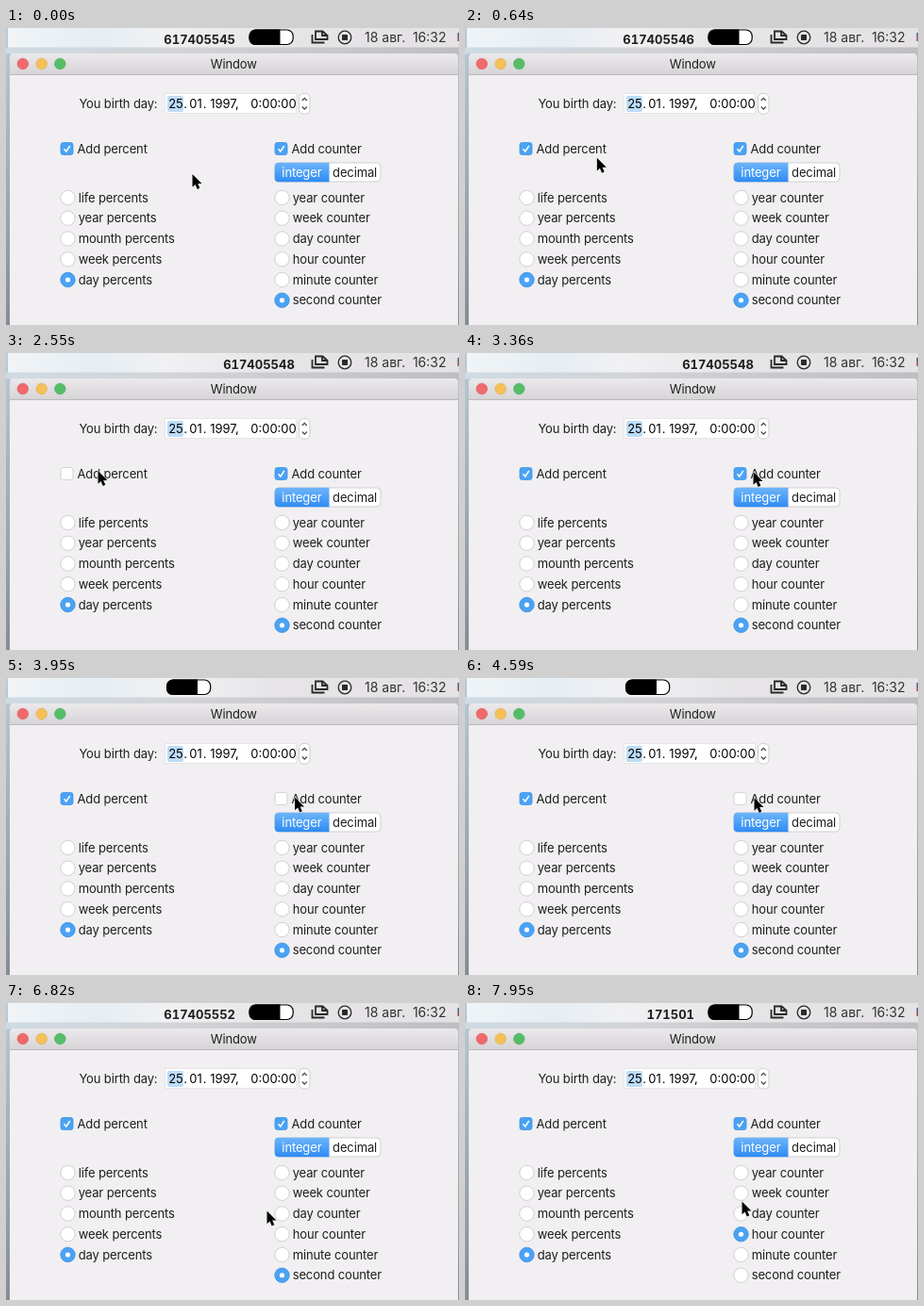
Write an HTML page that moves like this. It is 480 px wide and 315 px high and loops after 8 s.

```html
<!DOCTYPE html>
<html lang="en">
<head>
<meta charset="utf-8">
<title>Window</title>
<style>
html, body { margin: 0; width: 100%; height: 100%; overflow: hidden; background: #f1eff1; }
svg { display: block; width: 480px; height: 315px; }
text { font: 13px Inter, Roboto, sans-serif; letter-spacing: -.13px; fill: #1e1e1e; white-space: pre; }
.bold { font-weight: 700; letter-spacing: 0; font-variant-numeric: tabular-nums; }
.clock { font-size: 14px; letter-spacing: 0; fill: #333; }
.date { fill: #000; letter-spacing: 0; }
</style>
</head>
<body>
<svg viewBox="0 0 480 315">
  <defs>
    <linearGradient id="title" x2="0" y2="1"><stop stop-color="#ebe9eb"/><stop offset="1" stop-color="#d6d4d6"/></linearGradient>
    <linearGradient id="blue" x2="0" y2="1"><stop stop-color="#6db5f9"/><stop offset="1" stop-color="#2f8bf3"/></linearGradient>
    <linearGradient id="desk" x2="0" y2="1"><stop stop-color="#b9cbd8"/><stop offset="1" stop-color="#858d94"/></linearGradient>
    <linearGradient id="menu"><stop stop-color="#f0f4f7"/><stop offset=".2" stop-color="#e6eef3"/><stop offset=".35" stop-color="#f1f1f3"/><stop offset=".6" stop-color="#e6e4e6"/><stop offset="1" stop-color="#e4e2e4"/></linearGradient>
    <linearGradient id="gap"><stop stop-color="#cfdbe3"/><stop offset=".4" stop-color="#d2d3d7"/><stop offset="1" stop-color="#bfbdc1"/></linearGradient>
  </defs>
  <rect width="480" height="315" fill="url(#desk)"/>
  <rect x="2" width="478" height="21" fill="url(#menu)"/>
  <rect y="20.5" width="480" height="7" fill="url(#gap)"/>
  <path d="M4 315V32q0-5 5-5H474q5 0 5 5V315z" fill="#f1eff1"/>
  <path d="M4 49V32q0-5 5-5H474q5 0 5 5V49z" fill="url(#title)"/>
  <path d="M4 49.5H479" stroke="#bbb9bb"/>
  <g stroke-width=".6">
    <circle cx="17.8" cy="38" r="5.8" fill="#f0696b" stroke="#dc5a5c"/>
    <circle cx="37.700" cy="38" r="5.800" fill="#f5c058" stroke="#dfab45"/>
    <circle cx="57.300" cy="38" r="5.800" fill="#55bd68" stroke="#45a957"/>
  </g>
  <text x="241.3" y="42.5" text-anchor="middle">Window</text>

  <g fill="none" stroke="#2a2a2a" stroke-width="1.8">
    <path d="M328 3.500H335.500L340.500 8V12H328z"/>
    <path d="M324.500 7V15.500H337.500M335 4V8H340"/>
    <circle cx="359" cy="10" r="6.800" stroke-width="1.300"/>
  </g>
  <rect x="356" y="7" width="6" height="6" rx=".8" fill="#2a2a2a"/>
  <text class="clock" x="380" y="14.800">18 авг.</text>
  <text class="clock" x="466.500" y="14.800" text-anchor="end">16:32</text>
  <path d="M478.500 5h1.500v5h-1.500z" fill="#54608a"/>
  <path d="M478.500 10h1.500v4h-1.500z" fill="#a04c54"/>
  <text id="count" class="bold" y="17" text-anchor="end"></text>
  <g id="battery">
    <rect x=".5" y="2" width="46.200" height="15.500" rx="6.500" fill="#fff" stroke="#000" stroke-width="1.200"/>
    <path d="M33 1.500V18H7Q0 18 0 10T7 1.500z"/>
  </g>

  <text x="160.500" y="85" text-anchor="end">You birth day:</text>
  <rect x="168.500" y="69.500" width="139" height="21" fill="#fff" stroke="#e6e4e6"/>
  <rect x="171" y="72" width="17" height="17" rx="2" fill="#bcdcf8"/>
  <g id="date"></g>
  <rect x="310.500" y="69.500" width="11.500" height="21.500" rx="4.500" fill="#fff" stroke="#cfcdcf"/>
  <path d="M313.800 77l2.500-2.700 2.500 2.700M313.800 83.500l2.500 2.700 2.500-2.700" fill="none" stroke="#444" stroke-width="1.200"/>

  <g id="form"></g>
  <rect x="285" y="143" width="112" height="20" rx="4" fill="#fff" stroke="#cccacc" stroke-width=".9"/>
  <path d="M342.500 142.800V163.200H289q-4.300 0-4.300-4.300V147.100q0-4.300 4.300-4.300z" fill="url(#blue)"/>
  <text x="313.400" y="157.800" text-anchor="middle" style="fill:#fff">integer</text>
  <text x="369.600" y="157.800" text-anchor="middle">decimal</text>
  <path id="cursor" d="M0 0V13.800L3.100 11 5.200 16 7.800 14.800 5.700 10H10z" fill="#000" stroke="#fff" stroke-width=".9" stroke-linejoin="round" paint-order="stroke"/>
</svg>
<script>
const LOOP = 8000, TICK = 435;
const BLUE = '#4ba2f4', BLUE_EDGE = '#3c93e6', GREY = '#cccacc';
const $ = id => document.getElementById(id);

function add(parent, tag, attrs, text = '') {
  const el = document.createElementNS('http://www.w3.org/2000/svg', tag);
  for (const k in attrs) el.setAttribute(k, attrs[k]);
  el.textContent = text;
  parent.append(el);
  return el;
}

function paint(el, on) {
  el.setAttribute('fill', on ? BLUE : '#fff');
  el.setAttribute('stroke', on ? BLUE_EDGE : GREY);
}

const dateParts = [['25', 180], ['.', 190], ['01', 201], ['.', 210.5], ['1997,', 231.5], ['0:00:00', 283.5]];
for (const [s, x] of dateParts) add($('date'), 'text', { x, y: 85, class: 'date', 'text-anchor': 'middle' }, s);

function checkbox(x, label) {
  const box = add($('form'), 'rect', { x: x - 6.5, y: 121.5, width: 13, height: 13, rx: 2.5, 'stroke-width': .8 });
  const mark = add($('form'), 'path', { d: `M${x - 3} 128.2l2.3 2.8 4-6`, fill: 'none', stroke: '#fff', 'stroke-width': 1.5 });
  add($('form'), 'text', { x: x + 11, y: 132.7 }, label);
  return on => {
    paint(box, on);
    mark.setAttribute('visibility', on ? 'visible' : 'hidden');
  };
}

function radios(x, labels) {
  const rings = labels.map((label, i) => {
    const cy = 180 + i * 21.75;
    const ring = add($('form'), 'circle', { cx: x, cy, r: 7.7, 'stroke-width': .9 });
    add($('form'), 'circle', { cx: x, cy, r: 2.6, fill: '#fff' });
    add($('form'), 'text', { x: x + 11.2, y: cy + 4.6 }, label);
    return ring;
  });
  return picked => rings.forEach((ring, i) => paint(ring, i === picked));
}

const setPercent = checkbox(64.5, 'Add percent');
const setCounter = checkbox(291.5, 'Add counter');
const pickPercent = radios(65.5, ['life', 'year', 'mounth', 'week', 'day'].map(s => s + ' percents'));
const pickCounter = radios(292.5, ['year', 'week', 'day', 'hour', 'minute', 'second'].map(s => s + ' counter'));
pickPercent(4);

// time, x, y
const path = [
  [0, 197.5, 155], [200, 197.5, 155], [1000, 97.5, 125], [2650, 97.5, 125], [3230, 305.5, 126],
  [4590, 306.5, 127], [5730, 306.5, 125], [6250, 306.5, 125], [6820, 276.5, 220.5],
  [7120, 291, 243], [7450, 291, 243], [7900, 293.5, 210.5], [LOOP, 293.5, 210.5]
];

function cursorAt(t) {
  const i = Math.max(1, path.findIndex(p => p[0] > t));
  const [t0, x0, y0] = path[i - 1], [t1, x1, y1] = path[i];
  const u = (t - t0) / (t1 - t0), e = u * u * (3 - 2 * u);
  return [x0 + (x1 - x0) * e, y0 + (y1 - y0) * e];
}

const within = (t, a, b) => t >= a && t < b;
const tickAt = n => TICK + n * 1000;

function draw(t) {
  const ticks = Math.floor((t - TICK) / 1000) + 1;
  setPercent(!within(t, 1300, 2560));
  setCounter(!within(t, 3800, 6000));
  pickCounter(t < 7250 ? 5 : 3);

  // The menu bar item resizes only on a counter tick.
  const showCount = !within(t, 3800, tickAt(6));
  const narrow = within(t, tickAt(1), tickAt(3));
  const count = $('count');
  count.textContent = !showCount ? '' : t < tickAt(7) ? 617405545 + ticks : 171501;
  count.setAttribute('x', narrow ? 305.8 : 243);

  const battery = $('battery');
  battery.setAttribute('visibility', within(t, 1300, tickAt(3)) ? 'hidden' : 'visible');
  battery.setAttribute('transform', `translate(${showCount ? 257.5 : 170})`);
  $('cursor').setAttribute('transform', `translate(${cursorAt(t)})`);
}

const start = performance.now();
function frame() {
  draw((performance.now() - start) % LOOP);
  requestAnimationFrame(frame);
}
frame();
</script>
</body>
</html>
```
